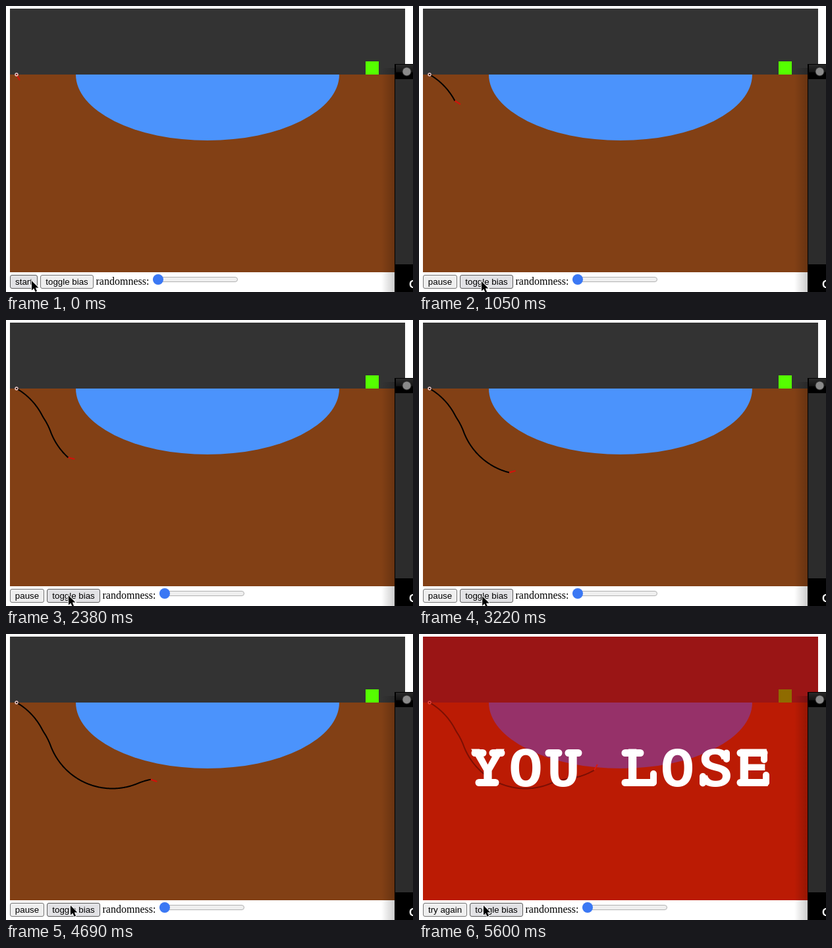
Animation of 618x434 px, one loop 6.37 s. Source, as an HTML page with a canvas:

```html
<!DOCTYPE html>
<html lang="en">
<head>
<meta charset="utf-8">
<title>Drill game</title>
<style>
html, body { margin: 0; width: 100%; height: 100%; overflow: hidden; background: #fff; }
canvas { display: block; }
</style>
</head>
<body>
<canvas id="stage" width="618" height="434"></canvas>
<script>
const ctx = document.getElementById('stage').getContext('2d');
const LOOP = 6370, STEP = 70, END = 5600;
const SANS = '"Liberation Sans", Arial, sans-serif';
const SERIF = '"Liberation Serif", Times, serif';
const MONO = '"Liberation Mono", Courier, monospace';

const DAY = { sky: '#333333', soil: '#824015', pool: '#4b93fc', goal: '#55ff00',
  pipe: '#000', bit: 'rgba(228,8,8,.85)', ring: '#f3cfcf' };
const LOST = { sky: '#9a1515', soil: '#bb1b04', pool: '#963169', goal: '#8f6b00',
  pipe: '#7c0f04', bit: '#d81a14', ring: '#ea4a42' };

// Drilled lengths at which the steering bias flips
const FLIPS = [56, 64, 85, 246, 274];
const TURN = 0.01;
const BIAS = Math.PI / 6;

// Pointer keys: time, x, y
const POINTER = [
  [0, 39, 417], [210, 39, 417], [560, 57, 421], [910, 95, 418], [2870, 95, 418],
  [3500, 97, 420], [3850, 41, 420], [3990, 41, 420], [4270, 98, 412], [LOOP, 98, 412]
];

function rect(x, y, w, h, fill) {
  ctx.fillStyle = fill;
  ctx.fillRect(x, y, w, h);
}

function box(x, y, w, h, r, fill, stroke) {
  ctx.beginPath();
  ctx.roundRect(x + .5, y + .5, w - 1, h - 1, r);
  ctx.fillStyle = fill;
  ctx.fill();
  ctx.strokeStyle = stroke;
  ctx.lineWidth = 1;
  ctx.stroke();
}

function disc(x, y, r, fill) {
  ctx.beginPath();
  ctx.arc(x, y, r, 0, Math.PI * 2);
  ctx.fillStyle = fill;
  ctx.fill();
}

function text(str, x, y, font, fill, align = 'left') {
  ctx.font = font;
  ctx.fillStyle = fill;
  ctx.textAlign = align;
  ctx.fillText(str, x, y);
}

function line(points, width, stroke) {
  ctx.beginPath();
  for (let i = 0; i < points.length; i += 2) ctx.lineTo(points[i], points[i + 1]);
  ctx.lineWidth = width;
  ctx.strokeStyle = stroke;
  ctx.stroke();
}

function pointerAt(t) {
  const i = POINTER.findIndex(k => k[0] > t);
  const [t0, x0, y0] = POINTER[i - 1], [t1, x1, y1] = POINTER[i];
  const p = (t - t0) / (t1 - t0), e = p * p * (3 - 2 * p);
  return [x0 + (x1 - x0) * e, y0 + (y1 - y0) * e];
}

const biasAt = s => FLIPS.filter(f => f < s).length % 2 ? -1 : 1;

function drill(length) {
  let x = 16, y = 104, a = BIAS;
  const points = [x, y];
  for (let s = 0; s < length; s++) {
    const d = Math.min(1, length - s), da = biasAt(s + .5) * TURN * d;
    x += Math.cos(a + da / 2) * d;
    y += Math.sin(a + da / 2) * d;
    a += da;
    points.push(x, y);
  }
  return { points, x, y, angle: a + biasAt(length) * BIAS };
}

function scene(c, length) {
  rect(6, 4, 600, 100, c.sky);
  rect(6, 104, 600, 300, c.soil);
  ctx.beginPath();
  ctx.ellipse(306, 104, 200, 100, 0, 0, Math.PI);
  ctx.fillStyle = c.pool;
  ctx.fill();
  rect(546, 84, 20, 20, c.goal);

  const d = drill(length);
  ctx.lineCap = 'butt';
  ctx.lineJoin = 'round';
  line(d.points, 2, c.pipe);
  line([d.x, d.y, d.x + 10 * Math.cos(d.angle), d.y + 10 * Math.sin(d.angle)], 2, c.bit);
  ctx.beginPath();
  ctx.arc(16, 104, 2, 0, Math.PI * 2);
  ctx.lineWidth = 1.3;
  ctx.strokeStyle = c.ring;
  ctx.stroke();
}

function banner() {
  const font = 'bold 85px ' + MONO;
  [...'YOU LOSE'].forEach((ch, i) => text(ch, 104.4 + i * 57.6, 231, font, '#fff', 'center'));
  // slab serifs
  ctx.lineCap = 'round';
  const bar = (x0, x1, y) => line([x0, y, x1, y], 11, '#fff');
  const tick = (x, y0, y1) => line([x, y0, x, y1], 10, '#fff');
  const top = 180.5, base = 225.5;
  bar(85, 97, top); bar(112, 125, top); bar(91, 116, base);
  bar(197, 212, top); bar(227, 242, top);
  bar(313, 336, top); bar(313, 355, base); tick(356, 212, base);
  bar(488, 524, top); bar(488, 526, base);
  tick(524, top, 191); tick(527, 214, base);
  tick(467, top, 190); tick(431, 216, base + 1);
}

function controls(label, width, px, py) {
  const button = (str, x, w) => {
    const hover = py >= 408 && py < 430 && px >= x && px < x + w;
    box(x, 408, w, 21, 2.5, hover ? '#e2e2e5' : '#efefef', hover ? '#5a5a5a' : '#767676');
    text(str, x + w / 2, 423, '13.333px ' + SANS, '#000', 'center');
  };
  const x = 6 + width + 4;
  button(label, 6, width);
  button('toggle bias', x, 81);
  text('randomness:', x + 84.5, 423, '16px ' + SERIF, '#000');
  box(x + 171, 411, 129, 8, 3.5, '#efefef', '#b2b2b2');
  disc(x + 179, 415, 8, '#3b78f4');
}

function sidePanel() {
  const shade = ctx.createLinearGradient(570, 0, 590, 0);
  shade.addColorStop(0, 'rgba(0,0,0,0)');
  shade.addColorStop(1, 'rgba(0,0,0,.2)');
  rect(570, 94, 20, 340, shade);
  rect(590, 88, 28, 346, '#000');
  const bar = ctx.createLinearGradient(0, 89, 0, 111);
  bar.addColorStop(0, '#2a2a2a');
  bar.addColorStop(.5, '#141414');
  bar.addColorStop(.55, '#000');
  bar.addColorStop(1, '#000');
  rect(592, 89, 26, 22, bar);
  rect(591, 111, 27, 281, '#2c2c2c');
  disc(608.5, 99.5, 7, '#333');
  disc(608.5, 99.5, 6, '#8a8a8a');
  text('C', 612, 428, 'bold 17px ' + SANS, '#fff');
}

function pointer(x, y) {
  ctx.save();
  ctx.translate(x, y);
  ctx.beginPath();
  for (const [a, b] of [[0, 0], [0, 14.5], [3.3, 11.4], [5.6, 16.8], [8, 15.8], [5.8, 10.6], [10.4, 10.4]])
    ctx.lineTo(a, b);
  ctx.closePath();
  ctx.lineJoin = 'miter';
  ctx.lineWidth = 1.6;
  ctx.strokeStyle = '#fff';
  ctx.stroke();
  ctx.fillStyle = '#000';
  ctx.fill();
  ctx.restore();
}

function draw(now) {
  const n = Math.floor((now % LOOP) / STEP), t = n * STEP;
  const lost = t >= END;
  const length = Math.max(0, Math.min(n, END / STEP - 1) * 4.05 - 4.6);
  const [px, py] = pointerAt(t);
  rect(0, 0, 618, 434, '#fff');
  scene(lost ? LOST : DAY, length);
  if (lost) banner();
  if (lost) controls('try again', 67, px, py);
  else if (n > 0) controls('pause', 52, px, py);
  else controls('start', 42, px, py);
  sidePanel();
  pointer(px, py);
}

const start = performance.now();
function tick() {
  draw(performance.now() - start);
  requestAnimationFrame(tick);
}
tick();
</script>
</body>
</html>
```
